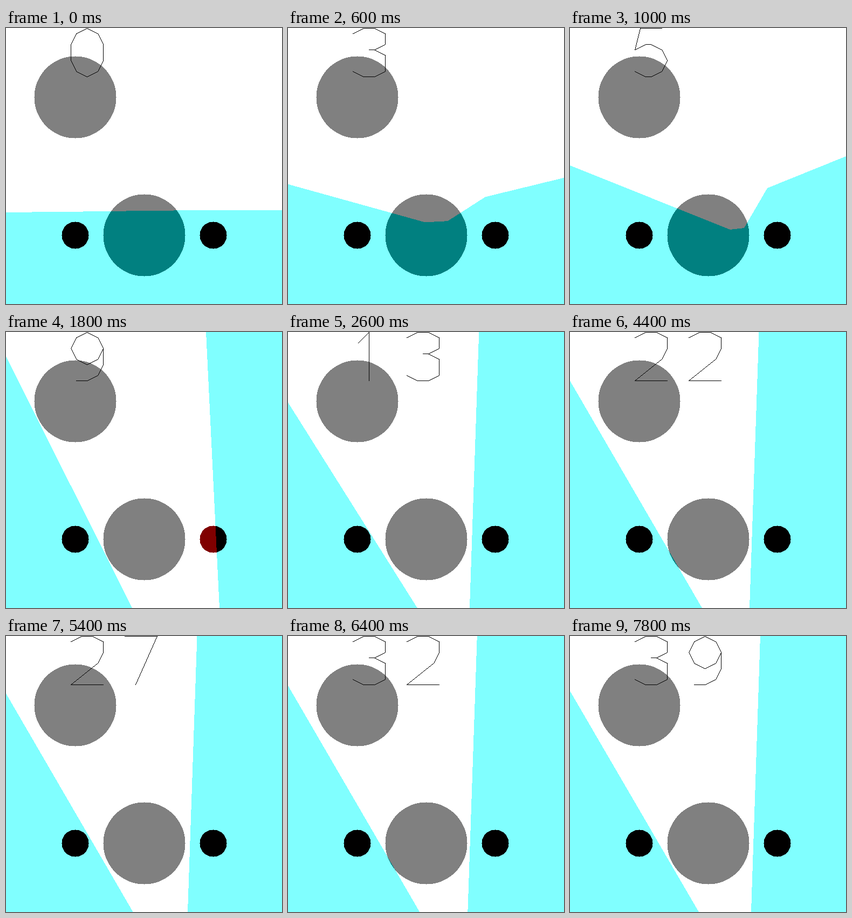
These frames come from a looping animation (512x512 px, 8 s). An HTML page:

```html
<!DOCTYPE html>
<html lang="en">
<head>
<meta charset="utf-8">
<style>
  html, body { margin: 0; width: 100%; height: 100%; overflow: hidden; background: #fff; }
  svg { display: block; width: 100vw; height: 100vh; isolation: isolate; }
  #region { fill: #7f0000; mix-blend-mode: difference; }
</style>
</head>
<body>
<svg viewBox="0 0 512 512" shape-rendering="crispEdges">
  <rect width="512" height="512" fill="#fff"/>
  <path id="large" fill="#808080"/>
  <path id="small" fill="#800000"/>
  <path id="region"/>
  <path id="counter"/>
</svg>
<script>
const STEP = 200, STEPS = 40;
const setPath = (id, d) => document.getElementById(id).setAttribute('d', d);
const mix = (a, b, k) => a + (b - a) * k;

// Hard-edged shapes, built from whole pixels
const pixelRow = (x, y, width) => `M${x} ${y}h${width}v1h${-width}z`;

function disc(cx, cy, r) {
  let d = '';
  for (let y = -r; y <= r; y++) {
    const half = Math.floor(Math.sqrt(r * r - y * y));
    d += pixelRow(cx - half, cy + y, 2 * half + 1);
  }
  return d;
}

function pixelLine([x0, y0], [x1, y1]) {
  const n = Math.max(Math.abs(x1 - x0), Math.abs(y1 - y0));
  let d = '';
  for (let i = 0; i <= n; i++) {
    d += pixelRow(Math.round(mix(x0, x1, i / n)), Math.round(mix(y0, y1, i / n)), 1);
  }
  return d;
}

// Digits sit on a 6 x 9 grid. An arc runs clockwise in eighths of a turn from the top.
function arc(from, to, top) {
  const points = [];
  for (let k = from; k <= to; k++) {
    const angle = k * Math.PI / 4;
    points.push([3 + Math.round(3 * Math.sin(angle)), top + 3 - Math.round(3 * Math.cos(angle))]);
  }
  return points;
}
const flip = points => points.map(([x, y]) => [x, 9 - y]).reverse();
const cap = [[0, 1], [2, 0], [4, 0], [6, 1], [6, 3]];
const bowl = flip(cap);
const nine = [...arc(2, 10, 0), ...arc(2, 4, 3), [1, 9]];

const DIGITS = [
  [...arc(-2, 2, 0), ...arc(2, 6, 3), [0, 3]],
  [[1, 2], [3, 0], [3, 9]],
  [...cap, [5, 5], [0, 9], [6, 9]],
  [...cap, [4, 4], [3, 4], [4, 4], [6, 5], ...bowl.slice(1)],
  [[4, 9], [4, 0], [0, 6], [6, 6]],
  [[5, 0], [1, 0], [0, 4], [2, 3], ...arc(0, 4, 3), [2, 9], [0, 8]],
  nine.map(([x, y]) => [6 - x, 9 - y]),
  [[0, 0], [6, 0], [2, 9]],
  [...cap, [4, 4], [6, 5], ...bowl.slice(1), [0, 5], [2, 4], [0, 3], [0, 1]],
  nine
];

function digitPath(digit, left) {
  const points = DIGITS[digit].map(([x, y]) => [left + 10 * x, 10 * y]);
  return points.slice(1).map((p, i) => pixelLine(points[i], p)).join('');
}

// White wedge: left edge height, left foot, right foot, right top
const wedge = (leftY, leftX, rightX, topX) => [
  [0, leftY], [leftX, 512], [rightX, 512],
  [(topX + rightX) / 2, 256], [topX + (topX - rightX) * .4, -205]
];

const linear = k => k;
const settle = k => 1 - (1 - k) ** 6;
const BOUNDARY = [
  { step: 0, ease: linear, points: [[0, 342], [190, 340], [256, 339], [366, 338], [700, 337]] },
  { step: 5, ease: linear, points: [[0, 255], [297, 374], [323, 371], [366, 297], [700, 162]] },
  { step: 9, ease: settle, points: wedge(45, 234, 396, 371) },
  { step: 17, ease: linear, points: wedge(132, 240, 336, 354) },
  { step: 22, ease: linear, points: wedge(90.5, 245, 333, 350.5) },
  { step: 39, ease: linear, points: wedge(102, 239, 336, 353) }
];
// The settled wedge swings sideways every ten steps
const SWING_START = 22, SWING_PERIOD = 10;

function boundaryAt(step) {
  const next = Math.max(1, BOUNDARY.findIndex(key => key.step >= step));
  const a = BOUNDARY[next - 1], b = BOUNDARY[next];
  const k = a.ease((step - a.step) / (b.step - a.step));
  // Late drift is slow at first, so the swing returns close to its start
  const drift = a.step === SWING_START ? k ** 4 : k;
  return a.points.map((p, i) => p.map((v, j) => mix(v, b.points[i][j], drift)));
}

function swingAt(step) {
  const phase = (step - SWING_START) / SWING_PERIOD;
  const fade = Math.min(1, Math.max(0, (STEPS - 1 - step) / 5));
  return phase > 0 ? 4 * fade * Math.sin(Math.PI * phase) ** 2 : 0;
}

setPath('large', disc(128, 128, 76) + disc(256, 384, 76));
setPath('small', disc(128, 384, 25) + disc(384, 384, 25));

let shown = -1;
function draw() {
  const step = Math.floor(performance.now() / STEP) % STEPS;
  if (step !== shown) {
    shown = step;
    const swing = swingAt(step);
    const edge = boundaryAt(step).map(([x, y], i) => i < 2 ? [x, y + 4 * swing] : [x + swing, y]);
    setPath('region', `M${edge.join('L')}L900 -205L900 900L0 900Z`);
    setPath('counter', [...String(step)].map((c, i) => digitPath(+c, 120 + 100 * i)).join(''));
  }
  requestAnimationFrame(draw);
}
draw();
</script>
</body>
</html>
```
